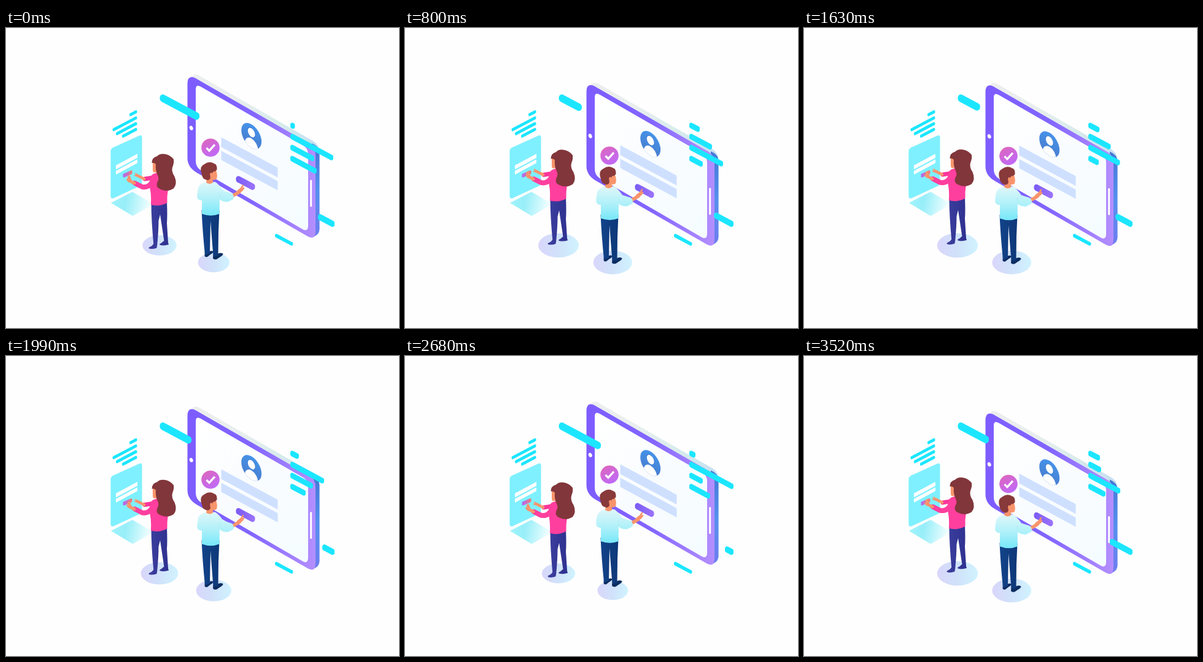
Write an HTML page with a canvas that moves like this. It is 640 px wide and 489 px high and loops after 3630 ms.

```html
<!DOCTYPE html>
<html lang="en">
<head>
<meta charset="utf-8">
<title>Login scene</title>
<style>
  html, body { margin: 0; width: 100%; height: 100%; overflow: hidden; background: #fefefe; }
  canvas { display: block; width: 640px; height: 489px; }
</style>
</head>
<body>
<canvas id="stage" width="640" height="489"></canvas>
<script>
const ctx = document.getElementById('stage').getContext('2d');
const LOOP = 3630;
const CYAN = '#1ce6ff', SKIN = '#f8946b';
const SLOPE = 0.535;

// Turning points of every moving part, in ms
const KEYS = [0, 800, 1280, 1990, 2680, 2960, 3520, LOOP];
const TRACKS = {
  float: [.1, .75, 1, .43, .02, .28, .78, .86],
  beam: [315, 288, 277, 302, 319, 313, 301, 299],
  rowA: [470.5, 480, 484, 477, 473, 476, 482, 483],
  rowB: [533, 500, 487, 518, 535, 517, 484, 479],
  rowC: [502, 518, 524, 500, 485, 495, 515, 519],
  rowD: [506, 485, 475, 488, 497, 495, 491, 490],
  tail: [508, 503, 502, 515, 521, 513, 498, 495]
};

const rate = (v, i) => (v[i + 1] - v[i]) / (KEYS[i + 1] - KEYS[i]);

// Slope at a key: flat at turning points, so the curve never overshoots
function tangent(v, i) {
  if (i === 0) return rate(v, 0);
  if (i === v.length - 1) return rate(v, i - 1);
  const a = rate(v, i - 1), b = rate(v, i);
  return a * b > 0 ? 2 * a * b / (a + b) : 0;
}

function valueAt(v, t) {
  let i = 0;
  while (i < KEYS.length - 2 && t >= KEYS[i + 1]) i++;
  const d = KEYS[i + 1] - KEYS[i];
  const u = (t - KEYS[i]) / d, w = 1 - u;
  return v[i] * w * w * (1 + 2 * u) + v[i + 1] * u * u * (3 - 2 * u) +
    d * u * w * (tangent(v, i) * w - tangent(v, i + 1) * u);
}

function gradient(x0, y0, x1, y1, ...colors) {
  const g = ctx.createLinearGradient(x0, y0, x1, y1);
  colors.forEach((c, i) => g.addColorStop(i / (colors.length - 1), c));
  return g;
}

function shape(d, fill) {
  ctx.fillStyle = fill;
  ctx.fill(new Path2D(d));
}

function ellipse(x, y, rx, ry, fill, turn = 0) {
  ctx.fillStyle = fill;
  ctx.beginPath();
  ctx.ellipse(x, y, rx, ry, turn, 0, 7);
  ctx.fill();
}

function stroke(d, color, width) {
  ctx.strokeStyle = color;
  ctx.lineWidth = width;
  ctx.lineCap = ctx.lineJoin = 'round';
  ctx.stroke(new Path2D(d));
}

// Slanted bar with vertical ends
function bar(x0, y0, x1, h, r, fill = CYAN, slope = SLOPE) {
  const y1 = y0 + (x1 - x0) * slope;
  const xm = (x0 + x1) / 2, ym = (y0 + y1) / 2;
  ctx.fillStyle = fill;
  ctx.beginPath();
  ctx.moveTo(xm, ym);
  ctx.arcTo(x1, y1, x1, y1 + h, r);
  ctx.arcTo(x1, y1 + h, x0, y0 + h, r);
  ctx.arcTo(x0, y0 + h, x0, y0, r);
  ctx.arcTo(x0, y0, x1, y1, r);
  ctx.closePath();
  ctx.fill();
}

function shifted(dy, draw) {
  ctx.save();
  ctx.translate(0, dy);
  draw();
  ctx.restore();
}

const BODY = 'M295.500 91Q295.500 76 308 81.500L495 189Q504 195 504 207L504 331Q504 346 492 340L311 236Q295.500 227 295.500 212Z';
const GLASS = 'M309 100Q309 91 317 95.500L484 191.500Q492 196 492 206L492 322Q492 333 483 328L318 232.500Q309 227 309 217Z';

function phone() {
  ctx.save();
  ctx.translate(6.5, -4);
  shape(BODY, gradient(300, 0, 504, 0, '#eceeee', '#e9eeee', '#d8ecec', '#c4dff0'));
  ctx.restore();
  shape('M498 188Q510.500 193 510.500 204V328Q510.500 336 500 341Z',
    gradient(0, 190, 0, 340, '#4677d6', '#5590ee', '#6f7cf0'));
  shape(BODY, gradient(296, 0, 504, 0, '#7d5cff', '#8265ff', '#b48fff'));
  shape(GLASS, gradient(320, 100, 480, 320, '#ffffff', '#f9fcff', '#f5fcff'));
  ellipse(301.7, 163, 2.8, 3.7, '#fff', -.4);
  stroke('M496.7 249V290', '#fff', 3);

  bar(350.5, 178, 442.5, 16, .5, '#cfe0ff', .54);
  bar(350.5, 200, 442.5, 15, .5, '#cfe0ff', .54);
  bar(374.5, 238.5, 405.5, 11.5, 4, gradient(375, 0, 406, 0, '#7a5cf4', '#9c74fc'));
  avatar();
  ellipse(333, 195, 14.8, 14.8, gradient(325, 181, 341, 209, '#dc66c0', '#be6afa'));
  ctx.lineCap = 'butt';
  ctx.lineJoin = 'miter';
  ctx.strokeStyle = '#fff';
  ctx.lineWidth = 3.4;
  ctx.stroke(new Path2D('M326.5 195.5L331 200L340 190'));
}

function avatar() {
  ctx.save();
  ctx.transform(.866, .5, 0, 1, 399.7, 176);
  ctx.beginPath();
  ctx.arc(0, 0, 19, 0, 7);
  ctx.clip();
  ctx.fillStyle = gradient(0, -19, 0, 19, '#4493ea', '#4a7ccc');
  ctx.fillRect(-20, -20, 40, 40);
  ellipse(0, 17, 12.5, 13, '#fff');
  ellipse(0, -5.5, 8.3, 8.3, '#4785da');
  ellipse(0, -5.5, 6.8, 7, '#fff');
  ctx.restore();
}

function laptop() {
  shape('M171 285L206 267L240 287L208 305.5Q206 306.5 204 305Z',
    gradient(174, 278, 238, 290, '#9df3fb', '#98eef9', '#c8f7fc', '#fbffff'));
  shape('M170.400 201Q170.400 197 174 195L217 175.500Q221.500 174 221.500 178V252Q221.500 256 217 258L175 277.500Q170.400 278.500 170.400 274Z', '#7ff0ff');
  bar(179, 224, 214, 6.5, .6, '#fff', -.54);
  bar(179, 233, 214, 6, .6, '#fff', -.54);
  bar(190.5, 238, 205.5, 6.5, 1.5, gradient(191, 0, 205, 0, '#ac6cf0', '#d26cc0', '#f08070'), -.45);
  for (const [x, y, x1] of [[201, 139.5, 213.5], [173.5, 164, 213.5], [179, 170.5, 213.5], [189, 174.5, 213.5]])
    bar(x, y, x1, 5.5, 1.8, CYAN, -.53);
}

function disc(x, y, rx, ry) {
  ellipse(x, y, rx, ry, gradient(x - rx, y, x + rx, y, '#d9d6fb', '#d0e2fa', '#d0f3ff'));
}

function woman() {
  const navy = gradient(237, 0, 264, 0, '#3a3d9c', '#2f3190');
  // feet and legs
  shape('M240 352L246 353L245.500 358.500Q239 361 233 359.500Q231.500 357.500 235 356.500Q238.500 355 240 352Z', navy);
  shape('M257 347L263.500 348L265 353Q257 355.500 250.500 353.500Q249 352 253 350.500Z', navy);
  shape('M236.500 284L262 283Q263 306 262 318L264 350L258 350.500L251 304L248.500 314Q248.500 330 246 356L240.500 355Q236.500 313 236.500 284Z', navy);
  // far arm
  stroke('M239 244L226 246', '#f9359a', 7);
  stroke('M225 246L214 240.500', SKIN, 4.5);
  stroke('M216 241L211 237.500M216 242L210 240.500', SKIN, 2.2);
  // torso
  shape('M235 244Q237 237 246 236L260 240Q266 248 264 262Q262 274 262.500 285Q249 292 236 288Q237 267 233 256Z', '#ff3f9e');
  // near arm
  stroke('M240 247Q234 261 222 259L210 253', '#ff3f9e', 8);
  stroke('M209 253L202 249.500', SKIN, 5);
  stroke('M201 248.500L199 243M203 248L200.500 241.500M200 250L197.500 247', SKIN, 2.8);
  // head
  shape('M239 219Q244 216 251 220L251 239Q246 239 244 235Q239 237 239 231Z', SKIN);
  shape('M237.500 220Q237.500 211 246 209Q250 204 259 205.500Q267 206.500 273 214Q274 220 271 227Q269 234 274.500 242Q279.500 254 273 261.500Q263 268 252 263Q243 260 246.500 251Q250 246 247 240Q243 232 244 222Q241 219 237.500 220Z', '#81363b');
}

function man() {
  const blue = gradient(319, 0, 347, 0, '#12438a', '#0e3878');
  shape('M324 363L332 364Q335 362.500 337.500 364.500Q337 367 333 369L328 373Q323.500 374 323.500 371Z', '#0c2d62');
  shape('M338 367L345 368Q350 365.500 353.500 368Q353.500 370.500 349 373L343 377Q337 378 337 374Z', '#0c2d62');
  shape('M318.500 297L347.500 297L346 332L345.500 371L337.500 372L333 314L332 367L324 370Q320 330 318.500 297Z', blue);
  const shirt = gradient(0, 250, 0, 304, '#e0f7fa', '#b4f1f9', '#7ae8f9');
  // hand behind the cuff
  stroke('M369 273.500L380 267', SKIN, 5.5);
  stroke('M379 266.500L383.500 263', SKIN, 6);
  stroke('M382 263L386 256.500M383 265L387 261', SKIN, 2.6);
  shape('M313 260Q317 252 327 251L341 251Q347 255 354 265L368 269.500Q372 273 370.500 279L361 283.500Q351 283 348 279L347.500 303Q334 308.500 319 303L319 281Q309.500 281 311.500 270Z', shirt);
  stroke('M349 277L347 269', '#a8e9f2', .8);
  // head
  shape('M328 238L342 232Q345 240 343 246Q339 249 337 247L337 252Q332 256 326 252Z', SKIN);
  shape('M317.500 234Q316 225 323 222Q331 216 339 221Q344 222 343.500 231L340 234Q337 233 336 237Q334 234 332 238L333 244Q331 250 325 247Q320.500 246 319.500 241Z', '#88393a');
}

function draw(t) {
  const now = {};
  for (const name in TRACKS) now[name] = valueAt(TRACKS[name], t);
  const p = now.float, lift = p - .1;

  ctx.fillStyle = '#fefefe';
  ctx.fillRect(0, 0, 640, 489);

  shifted(20 * lift, phone);
  bar(250.5, 105, now.beam, 13.5, 5);
  ['rowA', 'rowB', 'rowC', 'rowD'].forEach((row, i) => bar(463, 152.3 + 18 * i, now[row], 10, 3));
  bar(now.tail, 315.5 - (535 - now.tail) * SLOPE, 535, 11, 3.5);
  bar(438, 334, 467.5, 6.5, 2.3);

  laptop();
  disc(250, 354.3, 27 + 8 * p, 16 + 5 * p);
  disc(338.3, 382.2, 24.7 + 9.2 * p, 15.5 + 5 * p);
  shifted(-10.5 * lift, woman);
  shifted(11 * lift, man);
}

function tick() {
  draw(performance.now() % LOOP);
  requestAnimationFrame(tick);
}
tick();
</script>
</body>
</html>
```
